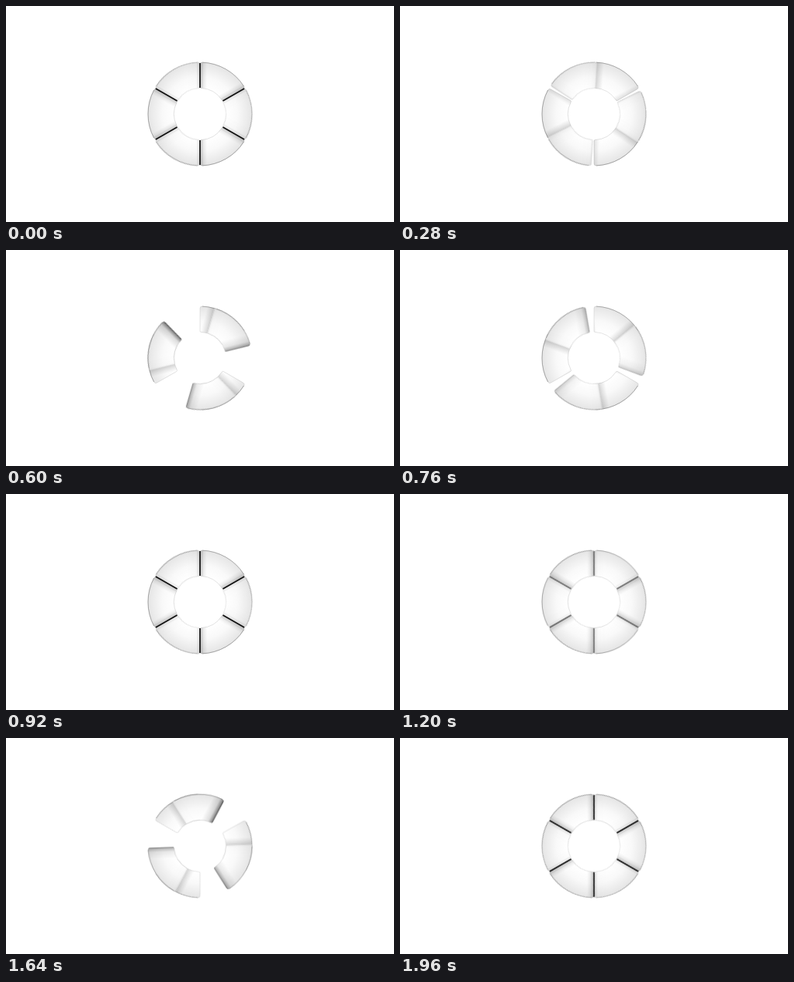
Animation of 500 by 280 pixels, one loop 2000 ms. Source, as an HTML page without scripts:

```html
<!DOCTYPE html>
<html lang="en">
<head>
<meta charset="utf-8">
<title>Ring loader</title>
<style>
html, body { margin: 0; width: 100%; height: 100%; overflow: hidden; background: #fff; }
svg { display: block; width: 500px; height: 280px; }

.turn { animation: turn 2s step-end infinite; }
.slide { animation: slide 1s linear infinite; }
.lead { animation: lead 1s linear infinite; }
.trail { animation: trail 1s linear infinite; }
.gaps { animation: gaps 1s linear infinite; }

/* every second the same move repeats one segment further on */
@keyframes turn {
  0% { transform: rotate(0deg); }
  50%, 100% { transform: rotate(60deg); }
}
/* cubic ease in, then cubic ease out */
@keyframes slide {
  0% { transform: rotate(0deg); }
  11.5% { transform: rotate(0deg); animation-timing-function: cubic-bezier(.3333, 0, .6667, 0); }
  55.75% { transform: rotate(60deg); animation-timing-function: cubic-bezier(.3333, 1, .6667, 1); }
  100% { transform: rotate(120deg); }
}
@keyframes lead {
  0%, 50% { opacity: .1; }
  60%, 66% { opacity: 1; }
  84%, 100% { opacity: .1; }
}
@keyframes trail {
  0%, 28% { opacity: .1; }
  42%, 50% { opacity: 1; }
  60%, 100% { opacity: .1; }
}
@keyframes gaps {
  0%, 17% { opacity: 1; }
  24%, 83% { opacity: 0; }
  90%, 100% { opacity: 1; }
}
</style>
</head>
<body>
<svg viewBox="0 0 500 280">
  <defs>
    <radialGradient id="skin" gradientUnits="userSpaceOnUse" cx="0" cy="0" r="67">
      <stop offset=".5" stop-color="#fff"/>
      <stop offset=".72" stop-color="#f9f9f9"/>
      <stop offset="1" stop-color="#e5e5e5"/>
    </radialGradient>
    <linearGradient id="dark" gradientUnits="userSpaceOnUse" x1="0" x2="15" y1="0" y2="0">
      <stop offset="0" stop-opacity=".95"/>
      <stop offset=".12" stop-opacity=".55"/>
      <stop offset=".4" stop-opacity=".17"/>
      <stop offset="1" stop-opacity="0"/>
    </linearGradient>
    <linearGradient id="thin" gradientUnits="userSpaceOnUse" x1="0" x2="12" y1="0" y2="0">
      <stop offset="0" stop-opacity=".8"/>
      <stop offset=".13" stop-opacity=".3"/>
      <stop offset=".25" stop-opacity=".1"/>
      <stop offset="1" stop-opacity="0"/>
    </linearGradient>
    <linearGradient id="soft" gradientUnits="userSpaceOnUse" x1="0" x2="-9" y1="0" y2="0">
      <stop offset="0" stop-opacity=".16"/>
      <stop offset=".45" stop-opacity=".08"/>
      <stop offset="1" stop-opacity="0"/>
    </linearGradient>

    <!-- one segment, 0 to 60 degrees clockwise from the top -->
    <path id="seg" d="M0-35V-64.2Q0-67 2.8-66.94A67 67 0 0 1 56.57-35.9Q58.02-33.5 55.6-32.1L30.31-17.5Q29.01-16.75 28.2-18.1A33.5 33.5 0 0 0 1.6-33.46Q0-33.5 0-35Z"/>
    <path id="rim" d="M2.8-66.94A67 67 0 0 1 56.57-35.9" fill="none" stroke="#777" stroke-width=".5"/>
    <g id="body">
      <use href="#seg" fill="url(#skin)" stroke="#bbb" stroke-width=".4"/>
      <use href="#rim"/>
    </g>
    <g id="three">
      <use href="#body"/>
      <use href="#body" transform="rotate(120)"/>
      <use href="#body" transform="rotate(240)"/>
    </g>
    <clipPath id="base">
      <use href="#seg"/>
      <use href="#seg" transform="rotate(120)"/>
      <use href="#seg" transform="rotate(240)"/>
    </clipPath>

    <g id="backs" fill="url(#thin)">
      <use href="#seg"/>
      <use href="#seg" transform="rotate(120)"/>
      <use href="#seg" opacity=".6" transform="rotate(240)"/>
    </g>
    <!-- front edges, seen mirrored; the upper left one is the darkest -->
    <use id="front" href="#seg" fill="url(#dark)" transform="rotate(60) scale(-1 1)"/>
    <g id="fronts">
      <use href="#front" opacity=".5"/>
      <use href="#front" opacity=".45" transform="rotate(120)"/>
      <use href="#front" opacity=".75" transform="rotate(240)"/>
    </g>
    <rect id="cast" x="-9" y="-68" width="9" height="36" fill="url(#soft)"/>
    <g id="casts">
      <use href="#cast"/>
      <use href="#cast" transform="rotate(120)"/>
      <use href="#cast" transform="rotate(240)"/>
    </g>
    <g id="gap" stroke="#111">
      <path d="M0-34V-66M0 34V66" stroke-width="8" opacity=".04"/>
      <path d="M0-34V-66M0 34V66" stroke-width="1.7"/>
    </g>
  </defs>

  <g transform="translate(250 140)">
    <g class="turn">
      <use href="#three"/>
      <g clip-path="url(#base)">
        <g class="slide">
          <g transform="rotate(-60)">
            <use href="#casts"/>
            <use href="#casts" transform="rotate(60) scale(-1 1)"/>
          </g>
        </g>
      </g>
      <g class="slide">
        <g transform="rotate(-60)">
          <use href="#three"/>
          <g class="trail"><use href="#backs"/></g>
          <g class="lead"><use href="#fronts"/></g>
        </g>
      </g>
      <g class="gaps">
        <use href="#gap"/>
        <use href="#gap" transform="rotate(60)"/>
        <use href="#gap" transform="rotate(120)"/>
      </g>
    </g>
  </g>
</svg>
</body>
</html>
```
